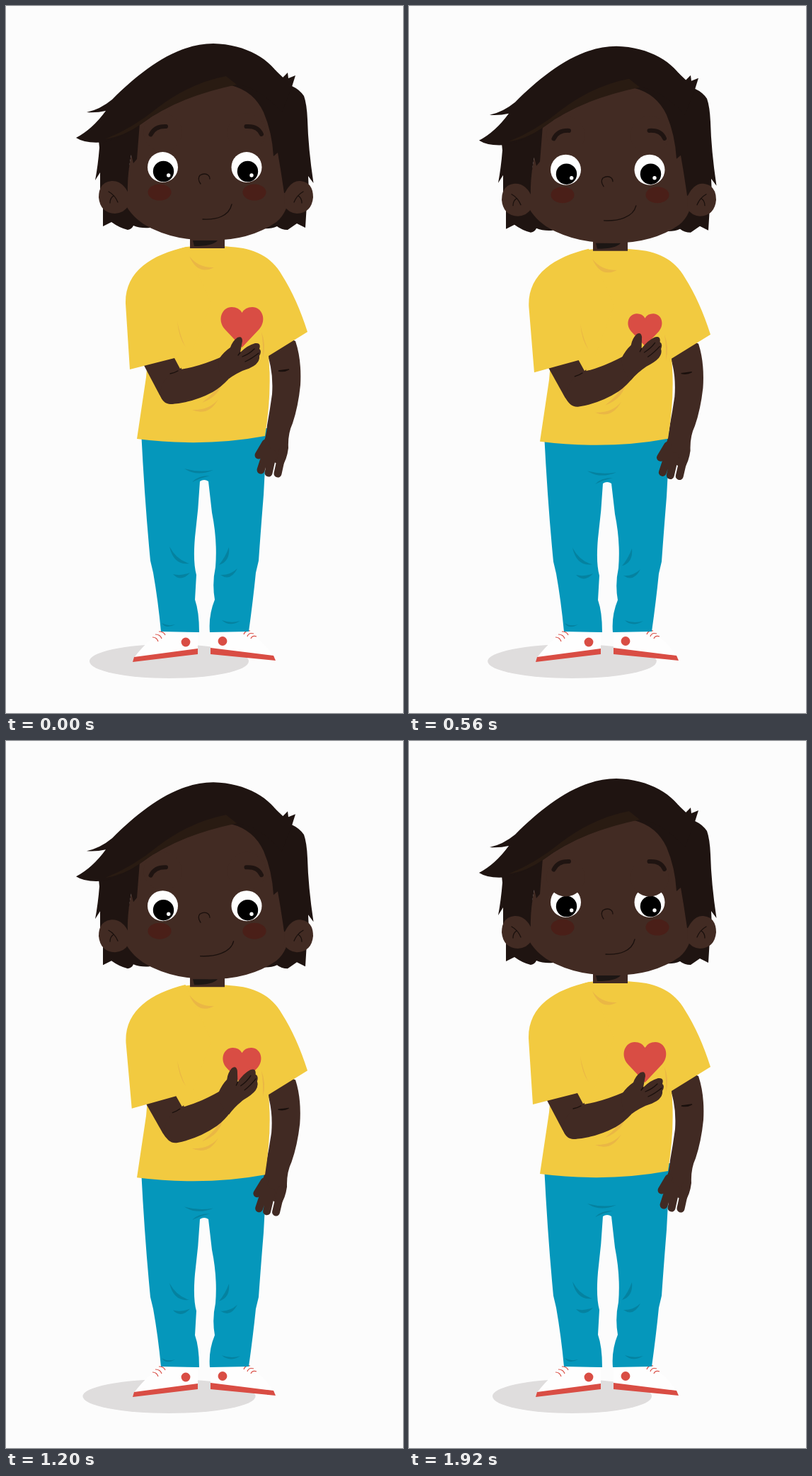
An HTML page for the animation above (2 s loop, 561 by 998 pixels).

```html
<!DOCTYPE html>
<html lang="en">
<head>
<meta charset="utf-8">
<title>Hand on heart</title>
<style>
  html, body { margin: 0; width: 100%; height: 100%; overflow: hidden; background: #fcfcfc; }
  svg { display: block; width: 100vw; height: 100vh; }
  .skin { fill: #422b23; }
  .arm { fill: #412a23; }
  .hair { fill: #1f1411; }
  .shirt { fill: #f2ca40; }
  .shirt-fold { fill: #eab745; }
  .pants { fill: #0597bb; }
  .pants-fold { fill: #0582a0; }
  .red { fill: #d94d44; }
  .white { fill: #fefefe; }
  .cheek { fill: #4a1f18; }
  .line { fill: none; stroke: #1a100d; stroke-width: 1.3; stroke-linecap: round; }
  .brow { fill: none; stroke: #1f1411; stroke-width: 6; stroke-linecap: round; }
  .finger { fill: none; stroke: #412a23; stroke-width: 11; stroke-linecap: round; }
  .lace { fill: none; stroke: #d94d44; stroke-width: 1.2; }
</style>
</head>
<body>
<svg viewBox="0 0 561 998" preserveAspectRatio="none">
  <ellipse id="shadow" cx="230.5" cy="925" rx="112.5" ry="24" fill="#dfdddd"/>

  <g id="shoes">
    <path class="white" d="M218 881H271V909L180 921Q192 905 206 893Q213 889 218 881Z"/>
    <path class="white" d="M289 881H343Q348 888 355 892Q368 902 379 919L289 908Z"/>
    <path class="red" d="M181 919L271 907V915L179 926Z"/>
    <path class="red" d="M289 906L378 917L381 924L289 915Z"/>
    <circle class="red" cx="254" cy="898" r="6.4"/>
    <circle class="red" cx="306" cy="896.5" r="6.4"/>
    <path class="lace" d="M207 891Q213 891 215 897M211 887Q218 887 220 893M216 883Q223 883 225 888M354 890Q348 888 346 893M350 886Q343 884 341 890M345 882Q338 881 336 887"/>
  </g>

  <g id="legs">
    <path class="pants" d="M191 600L369 596L364 690Q360 740 357 783L353 800Q349 840 343 883L288 884Q286 860 295 838Q291 815 296 792Q299 755 291 715L286 671Q280 667 274 671Q272 710 267 750Q264 785 269 803L267 838Q273 855 273 884L219 883Q215 840 208 800L204 783Q196 700 191 600Z"/>
    <g class="pants-fold">
      <path d="M252 653Q272 659 293 655Q270 665 252 653Z"/>
      <path d="M263 672Q271 663 288 663Q275 666 263 672Z"/>
      <path d="M231 763Q241 782 259 787Q237 790 231 763Z"/>
      <path d="M236 802Q247 805 260 800Q247 814 236 802Z"/>
      <path d="M315 764Q317 784 301 789Q310 778 315 764Z"/>
      <path d="M303 803Q316 804 327 794Q317 813 303 803Z"/>
      <path d="M220 871Q228 876 239 873Q226 880 220 871Z"/>
      <path d="M305 867Q318 872 331 868Q316 877 305 867Z"/>
    </g>
  </g>

  <g id="body">
    <g id="restArm">
      <path class="arm" d="M370 494L390 465L409 473Q418 500 416 535Q413 565 405 589Q398 604 399 624Q397 640 390 650L365 636L362 622Q368 608 369 592Q373 570 376 548Q378 518 370 494Z"/>
      <path class="finger" d="M367 617L357 634M369 627L360 655M377 632L371 659M391 628L384 660"/>
      <path class="line" d="M385 515Q393 517 400 513Q393 514 385 515Z"/>
    </g>
    <path class="shirt" d="M200 500V400C195 365 225 347 255 340Q286 336 318 340C350 342 375 353 390 380Q411 413 426 460L371 494Q376 545 366 607Q280 623 185 611L198 524Z"/>
    <g class="shirt-fold">
      <path d="M307 525Q304 550 277 560Q297 545 307 525Z"/>
      <path d="M300 555Q287 571 263 570Q286 580 300 555Z"/>
      <path d="M361 460Q368 478 363 497Q364 480 361 460Z"/>
    </g>
    <path id="heart" class="red" d="M333.5 482L309 456C298 443 305 425 319 425Q329 425 333.5 433Q338 425 348 425C362 425 369 443 358 456Z"/>

    <path id="upperArm" class="arm" d="M189 496L217 549Q224 562 235 562Q246 560 250 548L247 495Z"/>
    <g id="foreArm">
      <path class="arm" d="M233 562Q264 560 292 545Q304 538 314 527L303 496Q270 510 246 513Q222 520 217 547Q221 562 233 562Z"/>
      <g id="hand">
        <path class="arm" d="M309 531Q319 522 334 515Q347 511 353 506Q359 500 358 494Q362 487 358 484Q361 475 352 476Q341 479 331 489L334 473Q334 465 327 468Q320 473 317 482Q308 488 301 498Q298 515 309 531Z"/>
        <path class="line" d="M331 489L328 493M334 495Q344 491 351 484M338 502Q347 498 357 490"/>
      </g>
      <path class="line" d="M232 519Q238 518 243 515"/>
    </g>
    <path id="sleeve" class="shirt" d="M175 513L169 420C168 375 205 351 255 340L290 420L256 505L246 512L238 497Z"/>
    <path class="shirt-fold" d="M242 445Q246 466 254 482Q244 468 242 445ZM259 353Q272 370 294 369Q271 381 259 353Z"/>
    <path class="arm" d="M260 322H309V342H260Z"/>
    <path d="M264 331H299Q292 339 266 339Z" fill="#1c1614"/>

    <g id="head">
      <path class="hair" d="M137 280V311L149 305Q160 313 172 316Q178 315 180 310Q190 314 203 313L230 290H340L362 314Q374 315 383 311Q389 316 398 316L411 307L423 313L425 280Z"/>
      <path class="skin" d="M189 150L165 270C171 291 188 306 208 315Q242 331 288 331Q345 331 382 305Q400 290 400 262L390 150L345 108L300 100Z"/>
      <path class="hair" d="M130 180L132 200Q130 225 126 246L133 235V264H172Q171 240 177 210L180 222L185 216L189 165Z"/>
      <path class="hair" d="M318 112Q350 120 364 150Q376 178 378 212L384 207Q389 235 393 264L428 262L427 240L434.5 250Q427 200 426 160Q425 138 421 127Q415 118 404 113L380 90Z"/>
      <path class="skin" d="M173 264Q164 246 149 247Q131 249 131 270Q133 292 154 293Q167 292 173 282Z"/>
      <path class="skin" d="M394 264Q403 246 416 247Q434 249 434 270Q432 292 411 293Q399 292 393 282Z"/>
      <path class="line" d="M145 262Q154 267 158 277M152 268Q147 271 147 278M420 262Q411 267 407 277M413 268Q418 271 418 278"/>

      <path class="hair" d="M99 186Q122 174 141 148Q128 151 114 150Q133 146 150 132C190 92 240 53 293 53C340 54 375 76 389 103L398 94L399 102L409 98L404 114L390 150Q350 108 318 111Q240 130 189 168Q165 186 140 192Q113 195 99 186Z"/>
      <path d="M140 188Q180 172 215 143Q262 108 311 99L326 111Q240 129 189 168Q166 184 140 188Z" fill="#291b12"/>

      <ellipse class="cheek" cx="217" cy="263" rx="16.5" ry="11.5"/>
      <ellipse class="cheek" cx="351" cy="263" rx="16.5" ry="11.5"/>
      <circle class="white" cx="221.5" cy="227.5" r="21.5"/>
      <circle class="white" cx="340" cy="227.5" r="21.5"/>
      <circle cx="222.5" cy="233.5" r="14.7"/>
      <circle cx="341.5" cy="233.5" r="14.7"/>
      <circle class="white" cx="229.7" cy="239" r="2.7"/>
      <circle class="white" cx="347" cy="239" r="2.7"/>
      <g id="lids" class="skin">
        <circle cx="221.5" cy="227.5" r="27"/>
        <circle cx="340" cy="227.5" r="27"/>
      </g>
      <path id="brows" class="brow" d="M204.5 181.5Q210 169.5 226 170M339.5 170Q356 169 361 181"/>
      <path class="line" d="M275 251Q270 244 274 239Q281 235 286 239Q288 241 288 244"/>
      <path id="mouth" class="line"/>
    </g>
  </g>
</svg>
<script>
  const LOOP = 2000, STEP = 80, SWAY = 1940, DIP = 6, BLINK = 280;
  const el = id => document.getElementById(id);
  const move = (id, value) => el(id).setAttribute("transform", value);
  const clamp = x => Math.min(1, Math.max(0, x));

  // 0 = eyes open, 1 = closed
  const blink = t => clamp(Math.min(t - 1600 + BLINK, LOOP - t) / BLINK);

  function pose(t) {
    const angle = 2 * Math.PI * t / SWAY;
    const k = (1 - Math.cos(angle)) / 2;
    const beat = 0.895 + 0.105 * Math.cos(2 * angle);

    el("shadow").setAttribute("rx", 112.5 + 11 * k);
    move("body", `translate(0 ${DIP * k})`);
    move("legs", `translate(0 883) scale(1 ${1 - DIP * k / 271}) translate(0 -883)`);
    move("restArm", `rotate(${0.9 * k} 395 480)`);
    move("upperArm", `rotate(${-2 * k} 200 400)`);
    move("sleeve", `rotate(${-1.6 * k} 200 400)`);
    move("foreArm", `translate(${6.5 * k} 0) rotate(${-7.5 * k} 234 540)`);
    move("hand", `rotate(${-7 * k} 308 512)`);
    move("heart", `translate(333.5 453) scale(${beat}) translate(-333.5 -453)`);
    move("lids", `translate(0 ${-49 * (1 - blink(t))})`);
    move("brows", `translate(0 ${3.5 * k})`);

    const left = 278 - 4 * k, right = 319 + 3 * k, low = 301 - 3 * k, high = 280 - 3 * k;
    el("mouth").setAttribute("d",
      `M${left} ${low}C${left + 19} ${low + 1} ${right - 4} ${low - 4} ${right} ${high}`);
  }

  const start = performance.now();
  function frame() {
    const t = (performance.now() - start) % LOOP;
    pose(Math.floor(t / STEP) * STEP);
    requestAnimationFrame(frame);
  }
  frame();
</script>
</body>
</html>
```
